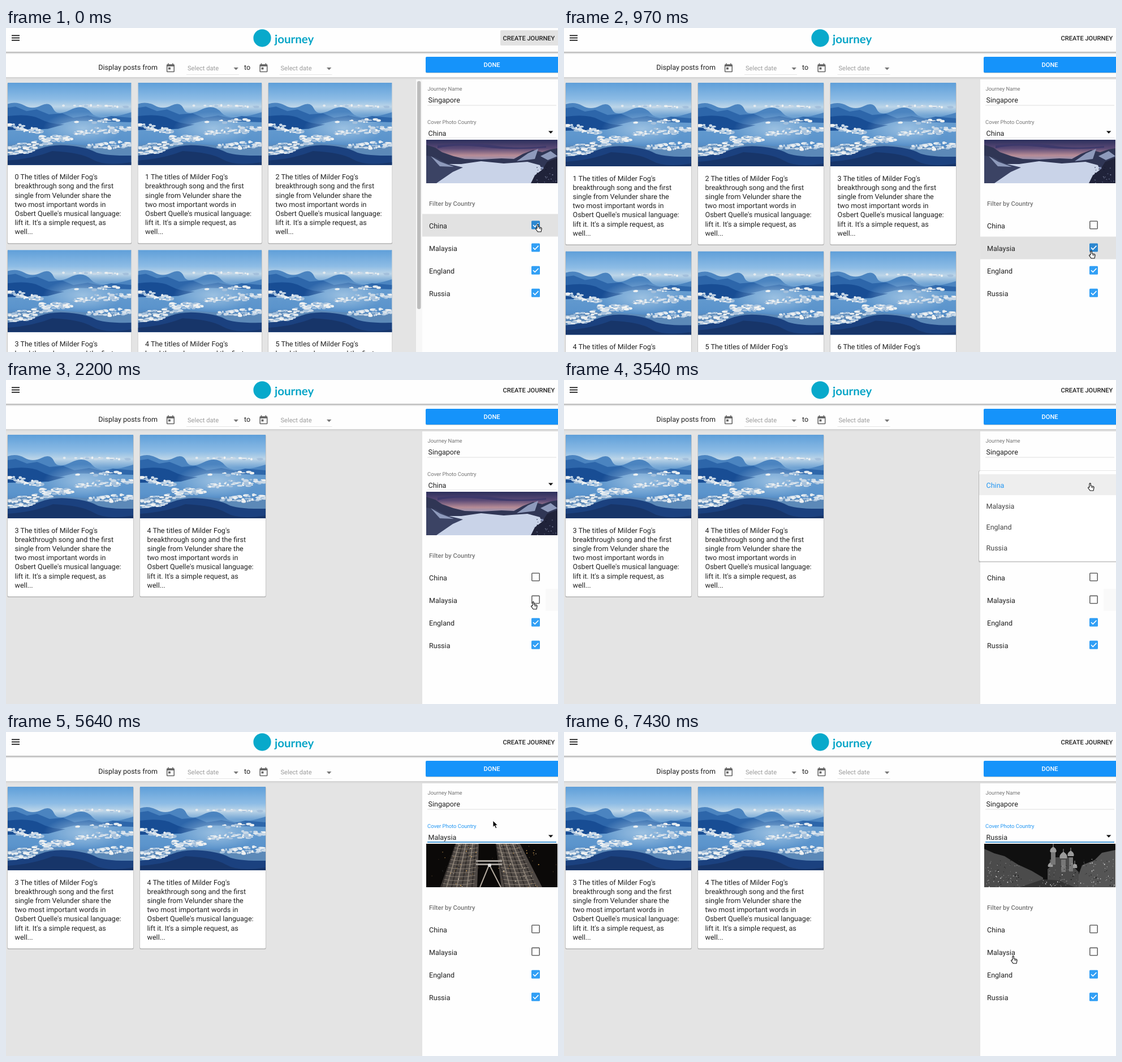
An HTML page for the animation above (8 s loop, 976x574 px).

```html
<!DOCTYPE html>
<html lang="en">
<head>
<meta charset="utf-8">
<title>Journey editor</title>
<style>
html, body { margin: 0; width: 100%; height: 100%; overflow: hidden; background: #fefefe; }
svg { display: block; }
text { font: 12.55px Roboto, sans-serif; fill: #212121; white-space: pre; text-rendering: geometricPrecision; }
.caps { font-size: 11.1px; font-weight: 500; }
.label { font-size: 9.45px; fill: #757575; }
.hint { font-size: 11.1px; fill: #9b9b9b; }
.brand { font: 700 20.5px Lato, sans-serif; fill: #08a5c7; }
</style>
</head>
<body>
<svg width="976" height="574" viewBox="0 0 976 574">
  <defs>
    <linearGradient id="sky" x2="0" y2="1">
      <stop offset="0" stop-color="#5f9fd9"/><stop offset=".2" stop-color="#8dbce5"/>
      <stop offset=".29" stop-color="#bcd5e8"/><stop offset=".4" stop-color="#6a9fd1"/>
      <stop offset=".7" stop-color="#5b94cc"/><stop offset="1" stop-color="#3a6fae"/>
    </linearGradient>
    <linearGradient id="dusk" x2="0" y2="1">
      <stop offset="0" stop-color="#2b2f5c"/><stop offset=".2" stop-color="#5b4a76"/>
      <stop offset=".36" stop-color="#b78c96"/><stop offset=".5" stop-color="#8795bd"/>
    </linearGradient>
    <radialGradient id="haze"><stop stop-color="#a9cae6" stop-opacity=".8"/><stop offset="1" stop-color="#a9cae6" stop-opacity="0"/></radialGradient>
    <symbol id="clouds" viewBox="0 0 222 148" preserveAspectRatio="none"></symbol>
    <symbol id="China" viewBox="0 0 232 77"></symbol>
    <symbol id="Malaysia" viewBox="0 0 232 77"></symbol>
    <symbol id="Russia" viewBox="0 0 232 77"></symbol>
    <path id="hand" d="M3 8V1.8q1.2-1.8 2.4 0V5.5l4.4 1q1.4.4 1.4 2L10 14H4.2L.6 9.2Q.8 7.4 3 8zM7 7v2M9 7.4v2" fill="#fff" stroke="#111" stroke-width="1.1"/>
    <path id="arrow" d="M0 0v11.5l2.7-2.4 2 4.6 2.1-.9-2-4.5h3.6z" fill="#000" stroke="#fff" stroke-width=".9"/>
    <path id="calendar" d="M19 3h-1V1h-2v2H8V1H6v2H5q-2 0-2 2v14q0 2 2 2h14q2 0 2-2V5q0-2-2-2zm0 16H5V8h14zM7 10h5v5H7z" fill="#666"/>
  </defs>
  <g id="scene"></g>
</svg>
<script>
const $ = id => document.getElementById(id);
const countries = ['China', 'Malaysia', 'England', 'Russia'];
const blurb = ["The titles of Milder Fog's", 'breakthrough song and the first', 'single from Velunder share the',
  'two most important words in', "Osbert Quelle's musical language:", "lift it. It's a simple request, as", 'well...'];

const rect = (x, y, w, h, fill, more = '') => `<rect x="${x}" y="${y}" width="${w}" height="${h}" fill="${fill}" ${more}/>`;
const text = (x, y, str, more = '') => `<text x="${x}" y="${y}" ${more}>${str}</text>`;
const shape = (d, fill) => `<path d="${d}" fill="${fill}"/>`;
const use = (id, x, y, more = '') => `<use href="#${id}" x="${x}" y="${y}" ${more}/>`;
const repeat = (n, make) => Array.from({ length: n }, (_, i) => make(i)).join('');
const caret = (x, y, fill) => shape(`M${x} ${y}h8.4l-4.2 4.4z`, fill);

let seed = 7;
const random = (a = 0, b = 1) => a + (b - a) * ((seed = seed * 16807 % 2147483647) / 2147483647);
const pick = list => list[Math.floor(random(0, list.length))];

// Puffs scattered along a line, thicker in its middle
const puffs = (x1, y1, x2, y2, n, spread) => repeat(n, () => {
  const k = random(), side = spread * (.4 + Math.sin(k * Math.PI));
  const x = x1 + (x2 - x1) * k, y = y1 + (y2 - y1) * k + random(-side, side);
  return `<ellipse cx="${x}" cy="${y}" rx="${random(1.5, 5.5)}" ry="${random(.8, 2.5)}" fill="${pick(['#f0f2f2', '#e3eaef', '#c8d8e7', '#a4c0dc'])}"/>`;
});
const lights = (n, x1, x2, y1, y2, colors) => repeat(n, () =>
  rect(random(x1, x2), random(y1, y2), random(.6, 1.8), random(.6, 2), pick(colors)));

$('clouds').innerHTML = rect(0, 0, 222, 148, 'url(#sky)')
  + shape('M0 38q16-5 30 3t30 0 22 6 30 2 38 5 72-1v16H0z', '#4b84c0')
  + shape('M0 45l14-2 20 8 18-3 22 9 24-2 20 8 26-4 24 5 18-4 36 3v8L120 68 70 80 0 78z', '#2d66aa')
  + shape('M0 60q40-5 58 5t44 10l-30 8-72 2z', '#184d94')
  + '<ellipse cx="135" cy="82" rx="72" ry="30" fill="url(#haze)"/>'
  + puffs(100, 41, 222, 43, 24, 1) + puffs(0, 76, 62, 88, 42, 4)
  + puffs(58, 99, 116, 100, 48, 5) + puffs(118, 91, 222, 82, 64, 5)
  + puffs(120, 71, 205, 67, 16, 2)
  + shape('M0 113q45-9 95-4t127 6v33H0z', '#5c89b8')
  + puffs(0, 118, 80, 107, 45, 5) + puffs(145, 114, 222, 111, 60, 5)
  + shape('M0 131q35-3 57-12t53-6 46 11 66 7v17H0z', '#1b417f')
  + shape('M0 140q45-3 80-17 50 2 72 15t70 5v5H0z', '#173569')
  + puffs(0, 127, 48, 122, 24, 3);

$('China').innerHTML = rect(0, 0, 232, 77, 'url(#dusk)')
  + shape('M20 10q60-7 100 0t92 1v3q-60 5-110-1T20 15z', '#3d396b')
  + shape('M0 9l16 5 12 8 20 7 20 5 30 1 35-2 22 1 16-9 18-7 16 4 15-5 12-2v36L150 43 55 45 0 76z', '#303655')
  + shape('M0 50l34-7 28 0 35-5 40 4 42-3 22 6 13 32H0z', '#c9d3e8')
  + shape('M0 28l16 3 20 11 29 7-18 8L18 77H0z', '#3b4364')
  + shape('M8 29l17 10 24 9-25-1zM160 38l20-14 18-8-6 18zM202 29l18-9 12 9-17 7z', '#8e9abb')
  + shape('M185 77l7-14 13-10 9-14 18-7v45z', '#20233a')
  + lights(28, 190, 230, 46, 76, ['#59617e', '#8b94b1', '#11142a']);

const tower = (d, x1, x2, dir) => shape(d, '#4e4844')
  + repeat(7, i => `<path d="M${x1 + i * 6} 0L${x2 + i * 9} 77" stroke="${i % 2 ? '#8f857a' : '#2b2725'}" stroke-width="1.6"/>`)
  + repeat(11, i => `<path d="M${x1 + (x2 - x1) * i / 11} ${i * 7}q22 ${5 * dir} ${40 + i * 1.6} 0" stroke="#a69a8b" fill="none" stroke-width=".7"/>`);
$('Malaysia').innerHTML = rect(0, 0, 232, 77, '#0b0908')
  + tower('M52 0h41l-3 77H25z', 52, 27, 1) + tower('M123 0h43l39 77h-72z', 123, 139, 1)
  + shape('M88 29h46v3H88zm0 6h46v3H88z', '#a5a09a')
  + '<path d="M111 38L95 77M112 38l20 39" stroke="#b5aca1" stroke-width="2"/><circle cx="112" cy="38" r="3" fill="#ddd"/>'
  + lights(45, 28, 92, 0, 77, ['#d7a456', '#eee0c5', '#222']) + lights(45, 126, 200, 0, 77, ['#d7a456', '#eee0c5', '#222'])
  + lights(15, 2, 230, 25, 76, ['#4f3d26']);

const dome = (x, y, r) => shape(`M${x - r} ${y + r}q-${r / 2}-${r} ${r}-${2 * r}q${1.5 * r} ${r} ${r} ${2 * r}zM${x - .5} ${y - r - 5}h1v6h-1z`, '#9b9b9b');
$('Russia').innerHTML = rect(0, 0, 232, 77, '#101010')
  + shape('M0 9l18 8 18 5 24 15 24 11 20 12v17H0z', '#4b4b4b')
  + shape('M232 11l-24 5-13 13-22 9-8 22v17h67z', '#555')
  + shape('M112 77V45l8-8 6-13h28l6 19 7 7v27z', '#4a4a4a')
  + dome(122, 10, 5) + dome(140, 20, 6) + dome(153, 17, 5) + dome(117, 37, 4) + dome(160, 39, 4)
  + shape('M118 15h8v22h-8zM136 28h8v22h-8zM150 24h7v25h-7z', '#777')
  + shape('M63 77l41-14 28 2 28 12z', '#343434')
  + lights(85, 2, 66, 29, 76, ['#ddd', '#888', '#1b1b1b']) + lights(70, 174, 230, 25, 76, ['#ddd', '#999', '#1b1b1b'])
  + lights(40, 113, 166, 35, 75, ['#ccc', '#888', '#171717']) + lights(25, 68, 175, 63, 76, ['#eee', '#777']);

const initial = { button: true, first: 0, count: 6, wide: false, off: 0, row: 0, patch: false,
  cover: 'China', focus: false, open: 0, menuX: 734, option: -1, shade: '#eee', pointer: 'hand', at: [936, 347] };

// Each step holds until the next; values carry over
const timeline = [
  [150, { button: false }],
  [300, { off: 1, first: 1, wide: true }],
  [450, { at: [936, 354] }],
  [600, { at: [934, 367] }],
  [820, { at: [930, 385], row: 1 }],
  [970, { at: [928, 394] }],
  [1120, { off: 2, first: 3, count: 2 }],
  [1420, { patch: true, row: -1 }],
  [1600, { at: [928, 393] }],
  [2200, { at: [928, 392] }],
  [2350, { at: [925, 335] }],
  [2500, { at: [922, 245], pointer: 'arrow' }],
  [2650, { at: [921, 171], pointer: 'hand' }],
  [2800, { at: [926, 182] }],
  [3090, { open: .25, focus: true }],
  [3240, { open: .65 }],
  [3390, { open: .9 }],
  [3540, { open: 1 }],
  [3990, { at: [885, 192] }],
  [4140, { at: [800, 216] }],
  [4290, { at: [751, 228] }],
  [4590, { option: 1 }],
  [4740, { shade: '#d6d6d6', patch: false }],
  [4890, { open: .5, cover: 'Malaysia' }],
  [5040, { open: 0 }],
  [5190, { pointer: 'arrow' }],
  [5490, { at: [805, 194] }],
  [5640, { at: [861, 157] }],
  [5790, { at: [830, 168] }],
  [5940, { at: [786, 184], pointer: 'hand' }],
  [6240, { open: .3, menuX: 723, option: -1 }],
  [6390, { open: .8 }],
  [6540, { open: 1, at: [786, 225] }],
  [6680, { at: [786, 255], pointer: 'arrow', option: 3, shade: '#eee' }],
  [6980, { shade: '#d6d6d6' }],
  [7130, { open: .5, cover: 'Russia' }],
  [7280, { open: 0, at: [790, 330] }],
  [7430, { at: [790, 396], pointer: 'hand' }],
];

function card(s, i) {
  const w = s.wide ? 222 : 218.5, photo = w * 2 / 3, h = photo + 138.5;
  const x = 3 + i % 3 * (w + 12), y = 97 + Math.floor(i / 3) * (h + 12);
  return rect(x - .6, y, w + 1.2, h + 1.6, '#00000038', 'rx="2"') + rect(x, y, w, h, '#fff', 'rx="2"')
    + use('clouds', x, y, `width="${w}" height="${photo}"`)
    + blurb.map((line, k) => text(x + 12.5, y + photo + 25.5 + k * 16.2, k ? line : `${s.first + i} ${line}`)).join('');
}

function dateField(x) {
  return use('calendar', 0, 0, `transform="translate(${x - 39.5} 61.8) scale(.785)"`)
    + text(x, 75, 'Select date', 'class="hint"') + caret(x + 81.5, 70, '#777') + rect(x - 2, 82, 93, 1, '#e6e6e6');
}

function filterRow(s, name, i) {
  const y = 329.5 + i * 40.1, hot = s.row === i;
  const box = i < s.off
    ? rect(929.8, y + 12.8, 13.4, 13.4, 'none', 'rx="1" stroke="#666" stroke-width="1.6"')
    : rect(929, y + 12, 15, 15, hot ? '#2c87d0' : '#319ff5', 'rx="1.5"')
      + `<path d="M932 ${y + 19.5}l3.2 3.2 6.2-6.4" fill="none" stroke="#fff" stroke-width="1.6"/>`;
  return (hot ? rect(736, y, 240, 40, '#e2e2e2') : '') + text(748, y + 25.2, name) + box;
}

function menu(s) {
  if (!s.open) return '';
  const chosen = countries.indexOf(s.menuX === 734 ? 'China' : 'Malaysia'), top = 161 - 37 * chosen;
  const rows = countries.map((name, i) => {
    const y = top + 6 + 37 * i, fill = i === s.option ? s.shade : i === chosen ? '#eee' : '';
    return (fill ? rect(s.menuX, y, 253, 37, fill) : '')
      + text(s.menuX + 12.5, y + 24, name, `style="fill:${i === chosen ? '#2196f3' : '#444'}"`);
  }).join('');
  const scale = .8 + .2 * s.open;
  return `<g opacity="${s.open}" transform="translate(0 ${185 * (1 - scale)}) scale(1 ${scale})">`
    + rect(s.menuX - 1, top - .5, 260, 162.5, '#00000030', 'rx="2"') + rect(s.menuX, top, 260, 160, '#fff', 'rx="2"') + rows + '</g>';
}

function sidePanel(s) {
  return rect(736, 91, 240, 483, '#fefefe')
    + text(745.5, 111.3, 'Journey Name', 'class="label"') + text(746.5, 131.5, 'Singapore') + rect(745, 136.5, 228, 1, '#e0e0e0')
    + text(745, 170.3, 'Cover Photo Country', `class="label" ${s.focus ? 'style="fill:#2196f3"' : ''}`)
    + text(746.5, 191, s.cover) + caret(959, 182.5, '#111')
    + rect(745, 194.3, 228, s.focus ? 1.6 : 1, s.focus ? '#1f82cc' : '#e6e6e6')
    + use(s.cover, 743, 198, 'width="232" height="77"')
    + text(748, 314.5, 'Filter by Country', 'class="caps" style="fill:#757575"')
    + (s.patch ? rect(954, 370, 22, 39, '#f9f9f9') : '')
    + countries.map((name, i) => filterRow(s, name, i)).join('');
}

function header(s) {
  return rect(0, 0, 976, 91, '#fefefe') + rect(0, 42, 976, 2, '#bdbdbd') + rect(0, 44, 976, 2, '#e5e5e5')
    + rect(0, 87, 976, 2, '#d4d4d4') + rect(0, 89, 976, 2, '#dedede')
    + repeat(3, i => rect(10, 12.5 + i * 4.2, 14, 1.7, '#111'))
    + '<circle cx="453" cy="17.8" r="15.6" fill="#08a9cb"/>' + text(475, 26.5, 'journey', 'class="brand"')
    + (s.button ? rect(874, 4, 106, 27, '#e2e2e2', 'rx="2"') : '')
    + text(878.5, 22, 'CREATE JOURNEY', 'class="caps"')
    + text(163.3, 73.5, 'Display posts from') + dateField(321) + text(421, 73.5, 'to') + dateField(485.5)
    + rect(742, 52, 236, 28, '#00000030', 'rx="2"') + rect(742, 51, 236, 28, '#1593fa', 'rx="2"')
    + text(859, 69, 'DONE', 'class="caps" text-anchor="middle" style="fill:#fff"');
}

function draw(s) {
  const scrollbar = s.wide ? '' : rect(725, 91, 11, 483, '#f7f7f7') + rect(727, 94, 6.5, 404, '#bcbcbc', 'rx="3.2"');
  return rect(0, 91, 976, 483, '#e4e4e4') + repeat(s.count, i => card(s, i)) + scrollbar
    + sidePanel(s) + header(s) + menu(s) + use(s.pointer, ...s.at);
}

let shown = -1;
function tick() {
  const now = performance.now() % 8000;
  const steps = timeline.filter(([time]) => time <= now);
  if (steps.length !== shown) {
    shown = steps.length;
    $('scene').innerHTML = draw(Object.assign({}, initial, ...steps.map(([, change]) => change)));
  }
  requestAnimationFrame(tick);
}
tick();
</script>
</body>
</html>
```
